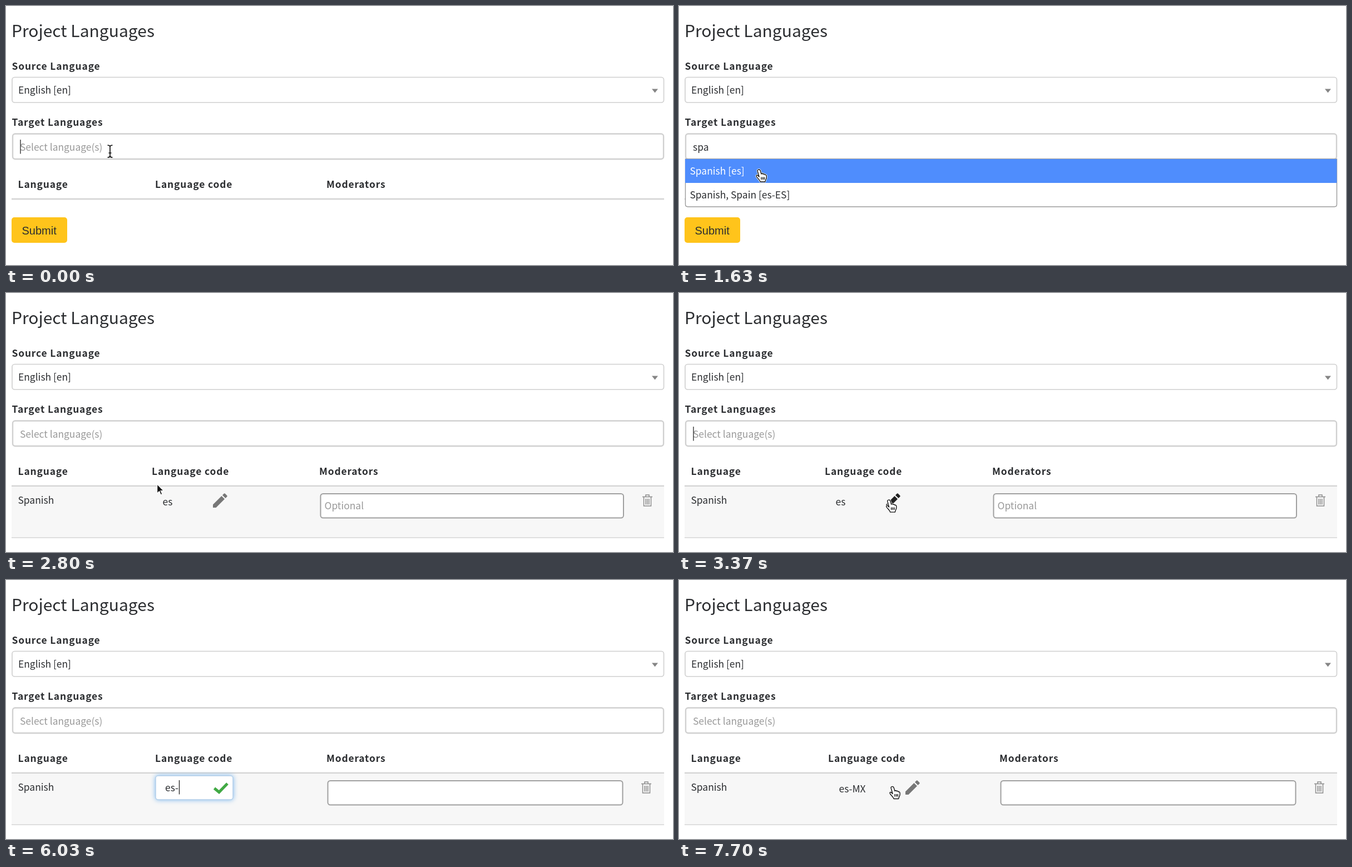
Write an HTML page that moves like this. It is 1199 by 467 pixels and loops after 8 s.

```html
<!DOCTYPE html>
<html lang="en">
<head>
<meta charset="utf-8">
<title>Project Languages</title>
<style>
html, body { margin: 0; width: 100%; height: 100%; overflow: hidden; background: #fff; }
svg { display: block; }
text { font: 17.4px "Noto Sans CJK SC", "Noto Sans CJK JP", "Noto Sans", sans-serif; fill: #2b2d30; white-space: pre; }
.title { font-size: 30px; }
.label { font-weight: 600; letter-spacing: .85px; }
.hint { fill: #999; }
.button { font: 20px "Liberation Sans", Arial, sans-serif; }
.glow { filter: drop-shadow(0 0 4px #7db8ee); }
</style>
</head>
<body>
<svg width="1199" height="467" viewBox="0 0 1199 467">
  <text class="title" x="10" y="56">Project Languages</text>
  <text class="label" x="10.5" y="115">Source Language</text>
  <rect x="11" y="128.5" width="1171.5" height="45.5" rx="4.5" fill="#fff" stroke="#cfcfcf" stroke-width="1.6"/>
  <text x="22" y="158">English [en]</text>
  <path d="M1161 149.5h11l-5.5 7z" fill="#858585"/>

  <text class="label" x="10.5" y="216">Target Languages</text>
  <rect x="12" y="230.5" width="1170" height="45.5" rx="4.5" fill="#fff" stroke="#d0d0d0" stroke-width="2.4"/>
  <text id="hint" class="hint" x="25" y="261">Select language(s)</text>
  <text id="query" x="25" y="261"></text>

  <text class="label" x="21.5" y="328">Language</text>
  <text class="label" id="codeHead" y="328">Language code</text>
  <text class="label" id="modHead" y="328">Moderators</text>
  <path d="M10 348H1183" stroke="#d3d3d3" stroke-width="2.6"/>

  <g id="submit">
    <rect x="10" y="381" width="100" height="46" rx="5" fill="#ffc41b"/>
    <text class="button" x="28.5" y="411.5">Submit</text>
  </g>

  <g id="row">
    <path d="M10 349.3H1183V441H10z" fill="#f7f7f7"/>
    <path d="M10 441.3H1183" stroke="#d6d6d6" stroke-width="1.4"/>
    <text x="21.5" y="380">Spanish</text>
    <g id="view">
      <text id="code" y="383"></text>
      <path id="pencil" d="M0 26V20.5L15.5 5L21 10.500L5.500 26zM17 3.500L19.800 .7Q20.800-.3 21.800.7L25.300 4.200Q26.300 5.200 25.300 6.200L22.500 9z"/>
    </g>
    <g id="editor">
      <rect id="frame" x="269" y="353" width="139" height="43" rx="4.500" fill="#fff" stroke="#b5d0ea" stroke-width="1.500"/>
      <rect id="selection" x="286" y="361" width="18" height="25" fill="#abd0fb"/>
      <text id="input" x="286" y="381"></text>
      <path d="M374.500 375.500L383 382.500L398 367" fill="none" stroke="#41a944" stroke-width="5"/>
    </g>
    <rect id="mods" y="362" height="43.500" rx="4.500" fill="#fff" stroke="#a0a0a0" stroke-width="2"/>
    <text id="optional" class="hint" x="572.500" y="390">Optional</text>
    <path id="trash" d="M0 4.500H18M6 4V1H12V4M2.500 5V21H15.500V5M6.200 8V18.500M9 8V18.500M11.800 8V18.500" fill="none" stroke="#8d8d8d" stroke-width="1.500"/>
  </g>

  <g id="list"></g>
  <path id="caret" stroke="#222" stroke-width="1.300"/>

  <g id="cursor">
    <g id="beam" fill="none">
      <path id="beamLine" d="M-4.500-11Q-.500-11 0-8.500Q.500-11 4.500-11M0-8.500V8.500M-4.500 11Q-.500 11 0 8.500Q.500 11 4.500 11M-2.500 3H2.500" stroke="#fff" stroke-width="3.600"/>
      <use href="#beamLine" style="stroke:#111"/>
      <path d="M-4.500-11Q-.500-11 0-8.500Q.500-11 4.500-11M0-8.500V8.500M-4.500 11Q-.500 11 0 8.500Q.500 11 4.500 11M-2.500 3H2.500" stroke="#111" stroke-width="1.700"/>
    </g>
    <g id="hand" transform="translate(-5 -1)" stroke-linejoin="round">
      <path d="M5 1C7 .3 8 2 8.500 4L10 9C11 7.500 13 7.800 13.200 9.400C14.200 8.400 16 8.900 16.200 10.400C17.500 9.800 19 10.800 19.200 12.500V15C19.200 18 17 19.500 16.700 23H8C7.500 20 4 17.500 1.500 14C0 11.500 2 10.300 3.800 11.800L6 14L3.500 5C2.500 2.500 3 1.500 5 1Z" fill="#fff" stroke="#fff" stroke-width="3"/>
      <path d="M5 1C7 .3 8 2 8.500 4L10 9C11 7.500 13 7.800 13.200 9.400C14.200 8.400 16 8.900 16.200 10.400C17.500 9.800 19 10.800 19.200 12.500V15C19.200 18 17 19.500 16.700 23H8C7.500 20 4 17.500 1.500 14C0 11.500 2 10.300 3.800 11.800L6 14L3.500 5C2.500 2.500 3 1.500 5 1ZM10 14.500V19M12.700 14.500V19M15.300 14.500V19" fill="#fff" stroke="#111" stroke-width="1.400"/>
    </g>
    <path id="arrow" d="M0 0V17L4 13.300L6.600 19.500L9.300 18.300L6.700 12.300H12z" fill="#111" stroke="#fff" stroke-width="1.300"/>
  </g>
</svg>
<script>
const LOOP = 8000;
const $ = id => document.getElementById(id);
const show = (id, on) => $(id).style.display = on ? "" : "none";
const set = (id, attrs) => { for (const k in attrs) $(id).setAttribute(k, attrs[k]); };
const within = (t, a, b) => t >= a && t < b;
const latest = (steps, t) => steps.findLast(s => s[0] <= t);

$("beam").querySelector("use").remove();

// [time, hotspot x, hotspot y]
const path = [
  [30, 187, 262], [730, 172, 268], [870, 172, 268], [1650, 143, 295],
  [1800, 143, 295], [2150, 116.5, 304], [2330, 116.5, 304], [3130, 362, 368],
  [3170, 362, 368], [3350, 376.5, 373], [3600, 384, 378], [3970, 384, 378],
  [4630, 332, 375], [6870, 332, 375], [7130, 351, 377], [7570, 383, 372.5]
];
const shapes = [[0, "beam"], [1080, "hand"], [2330, "arrow"], [3170, "hand"],
  [4180, "beam"], [5570, ""], [6870, "beam"], [7390, "hand"]];
const queries = [[0, ""], [900, "s"], [1030, "sp"], [1170, "spa"], [1730, ""]];
const codes = [[0, "es"], [5570, "es-"], [6330, "es-M"], [6430, "es-MX"]];

// [from, to, x, top]
const carets = [
  [0, 530, 26, 241], [900, 1030, 35, 241], [1030, 1170, 45, 241], [1170, 1600, 55, 241],
  [1760, 2600, 26, 241], [3100, 3600, 26, 241], [4800, 5300, 305.5, 361],
  [5570, 6070, 311.5, 361], [6330, 6430, 327.5, 361], [6430, 6900, 336.5, 361]
];
const matches = {
  "": ["Abkhazian [ab]", "Acoli [ach]", "Afar [aa]", "Afrikaans [af]", "Akan [ak]"],
  s: ["Afrikaans [af]", "Aragonese [an]", "Assamese [as]", "Asturian [ast]", "Basque [eu]"],
  sp: ["Esperanto [eo]", "Spanish [es]", "Spanish, Spain [es-ES]"],
  spa: ["Spanish [es]", "Spanish, Spain [es-ES]"]
};

function cursorAt(t) {
  const i = path.findIndex(p => p[0] > t);
  if (i < 1) return path.at(i).slice(1);
  const [a, b] = [path[i - 1], path[i]];
  const p = (t - a[0]) / (b[0] - a[0]), k = p * p * (3 - 2 * p);
  return [a[1] + (b[1] - a[1]) * k, a[2] + (b[2] - a[2]) * k];
}

let listed;
function drawList(query) {
  if (query === listed) return;
  listed = query;
  const items = matches[query], h = items.length * 43;
  $("list").innerHTML =
    `<path d="M11 276V${272 + h}q0 4.500 4.500 4.500H1178q4.500 0 4.500-4.500V276z" transform="translate(0 9.500)" fill="none"/>
     <path d="M11.500 276V${271 + h + 9}V${357.5 - 86 + h}q0 4.500 4.500 4.500H1178q4.500 0 4.500-4.500V276z" fill="#fff" stroke="#9a9a9a" stroke-width="1.400"/>
     <path d="M11 276H1182.500V319H11z" fill="#4f8dfd"/>`.replace(/<path[^>]*fill="none"\/>\s*/, "").replace(/V\d+(?=V)/, "") +
    items.map((s, i) => `<text x="19.500" y="${303.5 + 43 * i}"${i ? "" : ' style="fill:#fff"'}>${s}</text>`).join("");
}

function draw(t) {
  const query = latest(queries, t)[1], code = latest(codes, t)[1];
  const added = t >= 1730, edited = t >= 4000, editing = within(t, 4000, 7700);

  $("query").textContent = query;
  show("hint", !query);
  show("list", within(t, 100, 1730));
  drawList(query);

  const wide = !added || edited;
  set("codeHead", { x: wide ? 268 : 262 });
  set("modHead", { x: wide ? 576 : 563 });
  show("submit", !added);
  show("row", added);
  show("view", !editing);
  show("editor", editing);
  show("selection", t < 4800);
  show("optional", !edited);
  $("code").textContent = $("input").textContent = code;
  $("frame").classList.toggle("glow", editing);
  set("code", { x: edited ? 287.5 : 281.5 });
  set("pencil", {
    transform: `translate(${edited ? 407 : 372} 361)`,
    fill: within(t, 3170, 4000) ? "#222" : "#777"
  });
  set("mods", edited ? { x: 578.5, width: 530 } : { x: 565.5, width: 544.5 });
  set("trash", { transform: `translate(${edited ? 1142 : 1144} 363)` });

  const caret = carets.find(c => within(t, c[0], c[1]));
  show("caret", caret);
  if (caret) set("caret", { d: `M${caret[2]} ${caret[3]}v25.500` });

  const shape = latest(shapes, t)[1];
  for (const id of ["beam", "hand", "arrow"]) show(id, id === shape);
  set("cursor", { transform: `translate(${cursorAt(t)})` });
}

function tick() {
  draw(performance.now() % LOOP);
  requestAnimationFrame(tick);
}
tick();
</script>
</body>
</html>
```
